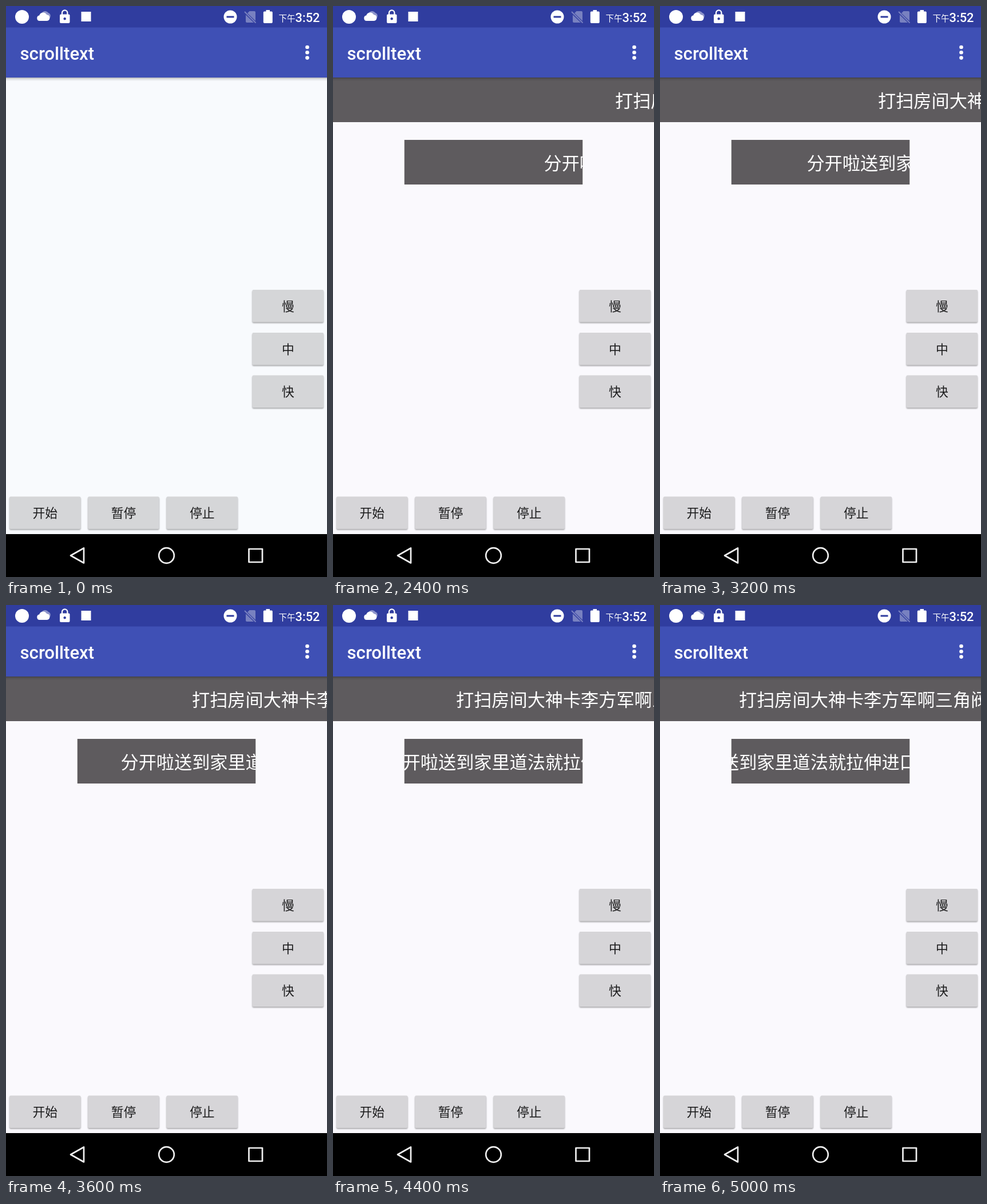
Animation of 561x998 px, one loop 5100 ms. Source, as an HTML page:

```html
<!DOCTYPE html>
<html lang="zh-CN">
<head>
<meta charset="utf-8">
<title>scrolltext</title>
<style>
html, body { margin: 0; width: 100%; height: 100%; overflow: hidden; background: #f8fafd; }
#stage { display: block; width: 100%; height: 100%; }
text { font-family: "Noto Sans CJK SC", "Noto Sans CJK", "Noto Sans CJK JP", sans-serif; white-space: pre; }
.latin { font-family: Roboto, sans-serif; font-weight: 500; fill: #fff; }
.label { font-size: 21.8px; text-anchor: middle; fill: #1b1b1c; }
.marquee text { font-size: 31.17px; fill: #fff; }
.nav { fill: none; stroke: #f0f0f0; stroke-width: 2.7; stroke-linejoin: round; }
</style>
</head>
<body>
<svg id="stage" viewBox="0 0 561 998">
  <defs>
    <linearGradient id="shade" x2="0" y2="1">
      <stop offset="0" stop-color="#000" stop-opacity=".32"/>
      <stop offset=".45" stop-color="#000" stop-opacity=".1"/>
      <stop offset="1" stop-color="#000" stop-opacity="0"/>
    </linearGradient>
    <filter id="soft" x="-10%" y="-20%" width="120%" height="140%">
      <feGaussianBlur stdDeviation="1.3"/>
    </filter>
  </defs>

  <rect id="page" width="561" height="998" fill="#f8fafd"/>
  <g id="buttons"></g>

  <g id="bars" visibility="hidden">
    <svg class="marquee" x="0" y="125" width="561" height="78">
      <rect width="561" height="78" fill="#5e5b5e"/>
      <text y="51.5">打扫房间大神卡李方军啊三角阀</text>
    </svg>
    <svg class="marquee" x="124.5" y="234" width="312" height="78">
      <rect width="312" height="78" fill="#5e5b5e"/>
      <text y="51.5">分开啦送到家里道法就拉伸进口</text>
    </svg>
  </g>

  <!-- app bar -->
  <rect y="124.5" width="561" height="7" fill="url(#shade)"/>
  <rect y="37" width="561" height="88" fill="#3f50b5"/>
  <rect width="561" height="37.5" fill="#303d9f"/>
  <text class="latin" x="24.5" y="94" font-size="31.17">scrolltext</text>
  <g fill="#fff">
    <circle cx="526.5" cy="72" r="3.3"/>
    <circle cx="526.5" cy="81.3" r="3.3"/>
    <circle cx="526.5" cy="90.6" r="3.3"/>
  </g>

  <!-- status bar -->
  <g fill="#fff">
    <circle cx="28" cy="19" r="12"/>
    <path d="M62 13a7 7 0 0 1 12-1a5.500 5.500 0 0 1 1 10h-6z" opacity=".45"/>
    <path d="M58.500 26a4.800 4.800 0 0 1-.3-9.500a7 7 0 0 1 13-1.200a5.400 5.400 0 0 1 .8 10.700z"/>
    <path d="M96 14.500h13.500q2 0 2 2v11.500q0 2-2 2h-13.500q-2 0-2-2v-11.500q0-2 2-2z"/>
    <path d="M98 15v-3a4.700 4.700 0 0 1 9.400 0v3" fill="none" stroke="#fff" stroke-width="2.200"/>
    <circle cx="102.700" cy="22.200" r="2.200" fill="#303d9f"/>
    <rect x="131.500" y="10" width="17" height="17"/>
    <circle cx="392" cy="19" r="11.500"/>
    <rect x="385.500" y="17.500" width="13" height="3" fill="#303d9f"/>
    <g opacity=".35">
      <path d="M425.500 9h8.500q2 0 2 2v15l-14-13.500zM419 15.500l14 13.500h-12q-2 0-2-2z"/>
      <path d="M417 10l19.500 19.500" stroke="#fff" stroke-width="2"/>
    </g>
    <path d="M454.500 7h6.500v2.500h3q1.800 0 1.800 1.800v17q0 1.800-1.800 1.800h-12.400q-1.800 0-1.800-1.800v-17q0-1.800 1.800-1.800h2.900z"/>
    <text x="476.500" y="27" font-size="14.600">下午</text>
    <text class="latin" x="505.500" y="27.500" font-size="21.800">3:52</text>
  </g>

  <!-- navigation bar -->
  <rect y="923" width="561" height="75"/>
  <g class="nav">
    <path d="M113 960.500L136 947.500V973.500Z"/>
    <circle cx="280.500" cy="960.500" r="13.300"/>
    <rect x="424.500" y="949" width="23.500" height="23"/>
  </g>
</svg>
<script>
const LOOP = 5100, STEP = 100, BARS_ON = 2000, TINT_ON = 1900;

// Distance travelled from the right edge: [ms, px]
const travel = [[2000, 12], [4000, 292], [4400, 346], [5000, 423]];

const buttons = [
  ["慢", 430.5, 496], ["中", 430.5, 571], ["快", 430.5, 645.5],
  ["开始", 6, 857.5], ["暂停", 143.2, 857.5], ["停止", 280.5, 857.5]
];

const byId = id => document.getElementById(id);
const page = byId("page"), bars = byId("bars"), group = byId("buttons");

function add(tag, attrs, text = "") {
  const el = document.createElementNS("http://www.w3.org/2000/svg", tag);
  for (const key in attrs) el.setAttribute(key, attrs[key]);
  el.textContent = text;
  group.append(el);
  return el;
}

const faces = buttons.map(([label, x, y]) => {
  const box = { x, width: 124.5, height: 56.5, rx: 2 };
  add("rect", { ...box, y: y + 1.8, fill: "#000", opacity: .33, filter: "url(#soft)" });
  const face = add("rect", { ...box, y });
  add("text", { class: "label", x: x + 62.3, y: y + 36.8 }, label);
  return face;
});

const lines = [...document.querySelectorAll(".marquee")].map(bar => ({
  text: bar.querySelector("text"),
  width: bar.width.baseVal.value
}));

function distance(t) {
  let i = 1;
  while (i < travel.length - 1 && t > travel[i][0]) i++;
  const [t0, d0] = travel[i - 1], [t1, d1] = travel[i];
  return d0 + (d1 - d0) * (t - t0) / (t1 - t0);
}

function draw(time) {
  const t = Math.floor(time % LOOP / STEP) * STEP;
  const tinted = t >= TINT_ON;
  page.setAttribute("fill", tinted ? "#faf9fd" : "#f8fafd");
  for (const face of faces) face.setAttribute("fill", tinted ? "#d6d5d8" : "#d5d6d8");
  bars.setAttribute("visibility", t >= BARS_ON ? "visible" : "hidden");
  const d = distance(Math.max(t, BARS_ON));
  for (const { text, width } of lines) text.setAttribute("x", width - d);
}

const start = performance.now();
function tick() {
  draw(performance.now() - start);
  requestAnimationFrame(tick);
}
tick();
</script>
</body>
</html>
```
